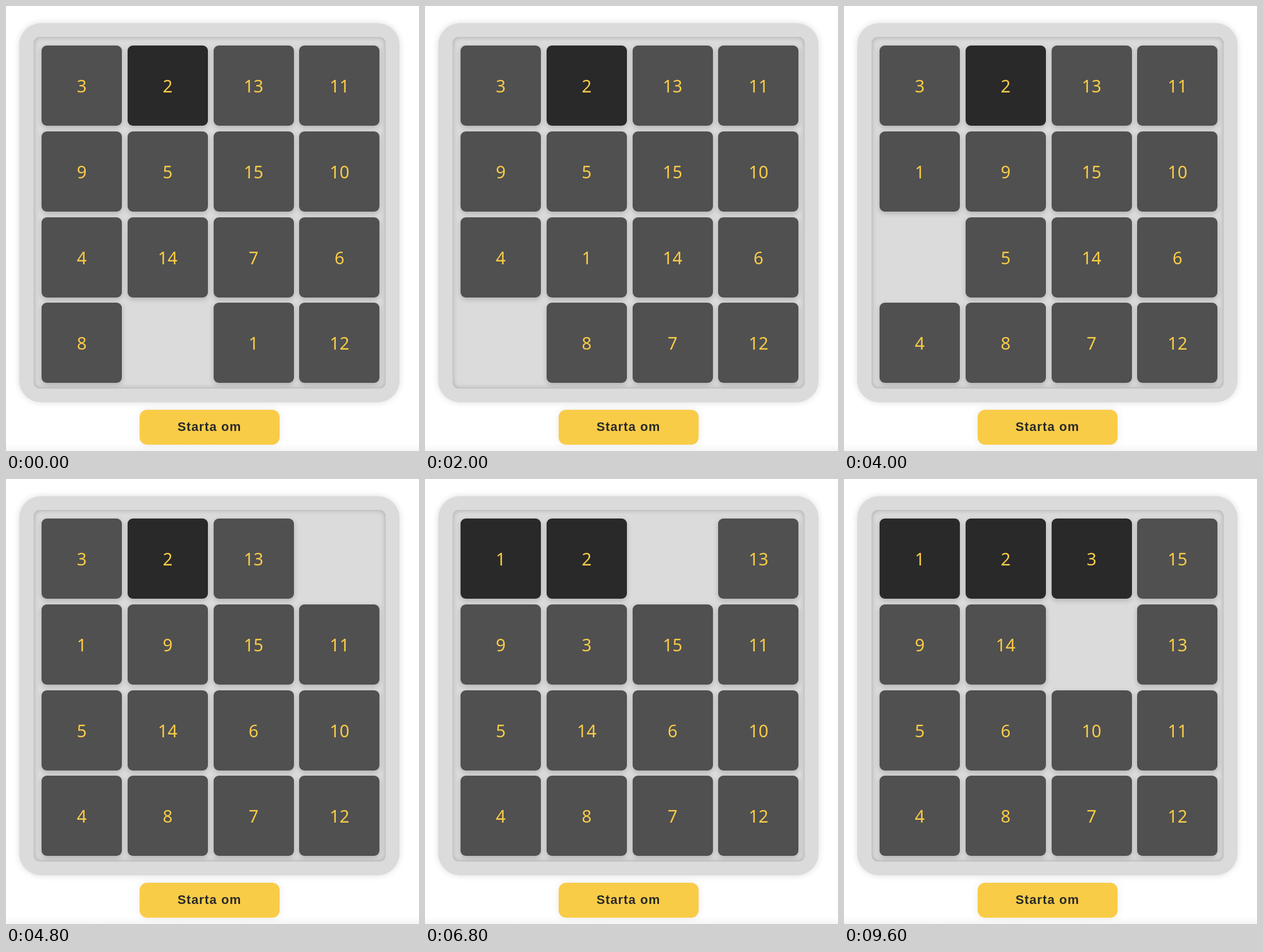
An HTML page for the animation above (10000 ms loop, 720 by 777 pixels).

```html
<!DOCTYPE html>
<html lang="sv">
<head>
<meta charset="utf-8">
<title>Sifferpussel</title>
<style>
  html, body { margin: 0; width: 100%; height: 100%; overflow: hidden; background: #fff; }
  #stage { position: relative; width: 720px; height: 777px; overflow: hidden; }
  #stage div { position: absolute; box-sizing: border-box; }
  #frame {
    left: 23px; top: 29.5px; width: 663px; height: 662.5px;
    border-radius: 38px; background: #dbdbdb; box-shadow: 0 0 12px rgba(0, 0, 0, .14);
  }
  #well {
    left: 48px; top: 54px; width: 613.5px; height: 614px;
    border-radius: 11px; box-shadow: inset 0 0 10px rgba(0, 0, 0, .24);
  }
  .tile { width: 140px; height: 140px; }
  .tile::before, .tile::after { position: absolute; inset: 0; border-radius: 9px; }
  .tile::before { content: ""; box-shadow: 0 3px 10px rgba(0, 0, 0, .2); }
  .tile::after {
    content: attr(data-n); z-index: 1; background: #505050; color: #f9cc47;
    font: 500 30px/142px "Noto Sans", "Open Sans", sans-serif; text-align: center;
  }
  .home::after { background: #292929; }
  #restart {
    left: 233px; top: 705px; width: 243.5px; height: 60.5px;
    border-radius: 13px; background: #f9cc47; color: #292929;
    box-shadow: 0 0 14px rgba(0, 0, 0, .09);
    font: bold 22px/60px "Liberation Sans", Arial, sans-serif;
    letter-spacing: 1.1px; text-align: center;
  }
  #fade { left: 0; top: 764px; width: 720px; height: 13px; background: linear-gradient(#f5f5f500, #f5f5f5); }
</style>
</head>
<body>
<div id="stage">
  <div id="frame"></div>
  <div id="well"></div>
  <div id="board"></div>
  <div id="fade"></div>
  <div id="restart">Starta om</div>
</div>
<script>
const STEP = 400, PITCH = 149.8;
const start = [3, 2, 13, 11, 9, 5, 15, 10, 4, 14, 7, 6, 8, 0, 1, 12];
// Cell that becomes empty on each move
const gaps = [14, 10, 9, 13, 12, 8, 9, 5, 4, 8, 11, 3, 0, 4, 5, 1, 2, 6, 5, 9, 11, 3, 2, 6];

// Slides every tile between the gap and the chosen cell
function slide(cells, to) {
  const next = cells.slice();
  let gap = next.indexOf(0);
  const sameRow = (gap >> 2) === (to >> 2);
  const dir = Math.sign(to - gap) * (sameRow ? 1 : 4);
  for (; gap !== to; gap += dir) next[gap] = next[gap + dir];
  next[to] = 0;
  return next;
}

const states = [start];
for (const to of gaps) states.push(slide(states[states.length - 1], to));

const board = document.getElementById("board");
const tiles = start.map((_, n) => {
  if (!n) return null;
  const tile = document.createElement("div");
  tile.className = "tile";
  tile.dataset.n = n;
  return board.appendChild(tile);
});

let shown = -1;
function draw(ms) {
  const i = Math.floor(ms / STEP) % states.length;
  if (i === shown) return;
  shown = i;
  states[i].forEach((n, cell) => {
    if (!n) return;
    tiles[n].style.left = 62 + (cell % 4) * PITCH + "px";
    tiles[n].style.top = 69 + (cell >> 2) * PITCH + "px";
    tiles[n].classList.toggle("home", n === cell + 1);
  });
}

const t0 = performance.now();
function tick() {
  draw(performance.now() - t0);
  requestAnimationFrame(tick);
}
tick();
</script>
</body>
</html>
```
